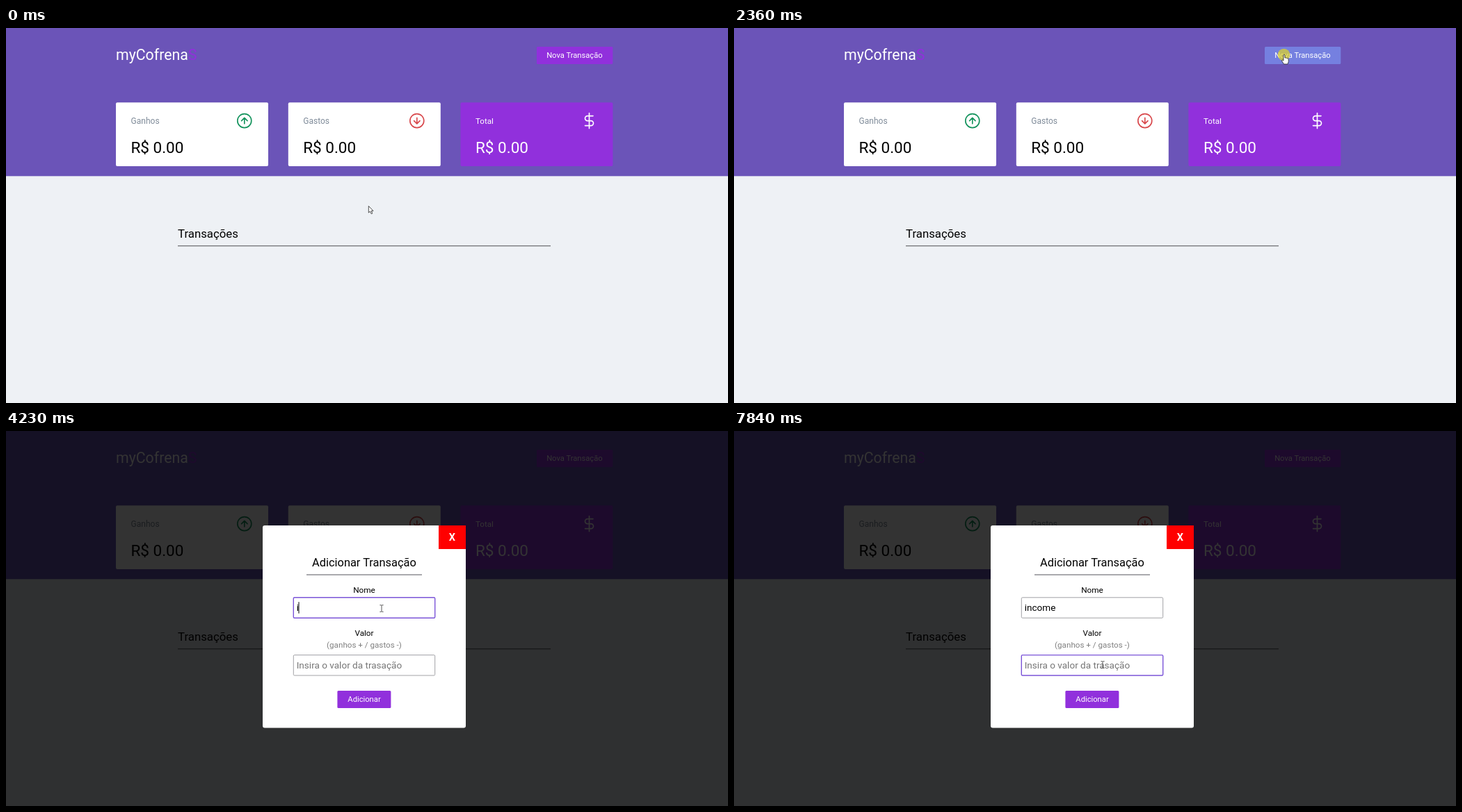
Write an HTML page that moves like this. It is 1038 px wide and 540 px high and loops after 8000 ms.

```html
<!DOCTYPE html>
<html lang="pt-BR">
<head>
<meta charset="utf-8">
<title>Transações</title>
<style>
  html, body { margin: 0; width: 100%; height: 100%; overflow: hidden; background: #eef1f5; }
  svg { display: block; width: 1038px; height: 540px; font-family: Roboto, Inter, sans-serif; }
  text { white-space: pre; }
  .mid { text-anchor: middle; }
  .brand { font-size: 21.3px; fill: #fff; }
  .label { font-size: 12px; fill: #7f8b99; }
  .sum { font-size: 22.5px; }
  .white { fill: #fff; }
  .accent { fill: #9130dc; }
  .icon { fill: none; stroke-width: 1.65; stroke-linecap: round; stroke-linejoin: round; }
  .btn { font-size: 11.2px; fill: #fff; }
  .field { fill: #fff; stroke: #a2a2a6; }
  .field.focus { stroke: #7b54d8; stroke-width: 1.4; }
  .value { font-size: 13.55px; }
  .value.hint { fill: #757575; }
  .hide { display: none; }
</style>
</head>
<body>
<svg viewBox="0 0 1038 540">
  <defs>
    <g id="ring">
      <circle r="10"/>
      <path d="M0 4.2V-4.2M-4.2 0L0-4.2L4.2 0"/>
    </g>
  </defs>

  <rect width="1038" height="540" fill="#eef1f5"/>
  <rect width="1038" height="213.3" fill="#6b54b8"/>
  <text class="brand" x="158" y="46.3">myCofrena<tspan class="accent">S</tspan></text>
  <rect id="open" x="763" y="27" width="109.3" height="25" rx="1.5"/>
  <text class="btn mid" x="817.4" y="43.4">Nova Transação</text>

  <g fill="#fff">
    <rect x="158" y="107.3" width="219" height="91.7" rx="2"/>
    <rect x="405.8" y="107.3" width="219" height="91.7" rx="2"/>
    <rect class="accent" x="653.4" y="107.3" width="219" height="91.7" rx="2"/>
  </g>
  <text class="label" x="179.6" y="137.8">Ganhos</text>
  <text class="sum" x="179.4" y="179.6">R$ 0.00</text>
  <use href="#ring" class="icon" stroke="#13935c" transform="translate(342.8 133.6)"/>
  <text class="label" x="427.3" y="137.8">Gastos</text>
  <text class="sum" x="427.2" y="179.6">R$ 0.00</text>
  <use href="#ring" class="icon" stroke="#d8484c" transform="translate(590.8 133.6) scale(1 -1)"/>
  <text class="label white" x="675" y="137.8" style="font-size:11.6px">Total</text>
  <text class="sum white" x="675" y="179.6">R$ 0.00</text>
  <path class="icon" stroke="#fff" transform="translate(826.5 121.6)"
    d="M12 1V23M17.5 5H9.5a3.5 3.5 0 0 0 0 7h5a3.5 3.5 0 0 1 0 7H6"/>

  <text x="247" y="302" font-size="16.8">Transações</text>
  <rect x="247" y="313.3" width="536" height="1" fill="#4c4c50"/>

  <g id="modal">
    <rect width="1038" height="540" opacity=".8"/>
    <rect x="369" y="136" width="292" height="291.6" rx="3" fill="#fff"/>
    <rect x="622" y="136" width="39" height="34" fill="#f00"/>
    <text class="mid white" x="641.4" y="157.7" font-size="14.5" font-weight="700">X</text>
    <text class="mid" x="514.9" y="195" font-size="16.4">Adicionar Transação</text>
    <rect x="432" y="206.5" width="166" height="1" fill="#55555c"/>
    <text class="mid" x="515" y="233.4" font-size="11.8">Nome</text>
    <rect class="field" id="name" x="413.3" y="239.8" width="203.4" height="29.4" rx="1.5"/>
    <text class="value" id="nameText" x="417.7" y="259"></text>
    <text class="mid" x="515" y="295.3" font-size="11.7">Valor</text>
    <text class="mid" x="515" y="312.3" font-size="11.65" fill="#808080">(ganhos + / gastos -)</text>
    <rect class="field" id="amount" x="413.3" y="322.6" width="203.4" height="29.4" rx="1.5"/>
    <text class="value hint" x="417.7" y="341.8">Insira o valor da trasação</text>
    <rect id="caret" width="1" height="16.5"/>
    <rect class="accent" x="476.4" y="374" width="77" height="25" rx="1.5"/>
    <text class="btn mid" x="515" y="390.4">Adicionar</text>
  </g>

  <circle id="click" r="8.8" fill="#e4d91c" opacity=".68"/>
  <g id="pointer" stroke-linejoin="round">
    <path id="arrow" fill="#fff" stroke="#222" stroke-width=".8"
      d="M.3.4V10L2.5 8L4.2 11.6L5.8 10.9L4.2 7.3H7Z"/>
    <path id="hand" fill="#fff" stroke="#222" stroke-width=".8"
      d="M-1 .8Q0-.7 1 .8V5Q2 4.2 2.7 5.3Q3.8 4.7 4.4 5.8Q6 5.3 6.2 7V10.5L5 14H-.5L-3.8 8.8Q-3.6 7-1 9Z"/>
    <path id="beam" fill="none" stroke="#444" stroke-width=".9"
      d="M-2.6-4.8H-.8L0-4.2L.8-4.8H2.6M0-4.2V4.2M-2.6 4.8H-.8L0 4.2L.8 4.8H2.6"/>
  </g>
</svg>
<script>
const LOOP = 8000, TICK = 57;
const $ = id => document.getElementById(id);
const show = (id, on) => $(id).classList.toggle('hide', !on);
const within = (t, a, b) => t >= a && t < b;

// Pointer moves: each starts at a time and passes through [time, x, y] points.
const route = [
  [0, 521, 256], [493, 521, 256], [780, 632, 180], [1010, 729, 97], [1120, 750, 87],
  [1235, 772, 70], [1350, 783, 58], [1407, 786, 51], [1980, 791, 38], [2470, 791, 38],
  [2760, 680, 130], [3110, 548, 226], [3160, 544, 246], [3340, 540, 255.5],
  [5543, 540, 255.5], [5600, 538, 268], [5700, 532, 303], [5830, 531, 322],
  [6040, 530, 336.5], [8000, 530, 336.5]
];
const typed = [[4230, 'i'], [4400, 'n'], [4570, 'c'], [4740, 'o'], [4910, 'm'], [5200, 'e']];
const clicks = [[2310, 2430], [3280, 3400], [6210, 6330]];
const carets = [[3280, 3830], [4230, 5420], [6210, 6780], [7280, 7840]];

function pointAt(t) {
  const i = Math.max(1, route.findIndex(p => p[0] > t));
  const [t0, x0, y0] = route[i - 1], [t1, x1, y1] = route[i];
  const k = (t - t0) / (t1 - t0);
  return [x0 + (x1 - x0) * k, y0 + (y1 - y0) * k];
}

// Screen captures arrive in even ticks, counted from the start of each move.
function captured(t) {
  const start = [0, 550, 1400, 2430, 3160, 5600].filter(s => s <= t).pop();
  return start + Math.floor((t - start + 4) / TICK) * TICK;
}

function mix(a, b, k) {
  return `rgb(${a.map((v, i) => Math.round(v + (b[i] - v) * k))})`;
}

function draw(t) {
  const [x, y] = pointAt(Math.min(captured(t), LOOP - 1));
  const overButton = within(t, 1400, 2430);
  const overField = within(t, 3160, 5600) || t >= 5830;
  const hover = within(t, 1400, 2540) ? Math.min(1, (t - 1350) / 200) : 0;
  $('open').style.fill = mix([145, 48, 220], [117, 128, 224], hover);

  $('pointer').setAttribute('transform', `translate(${x} ${y})`);
  show('pointer', !within(t, 4280, 5600));
  show('arrow', !overButton && !overField);
  show('hand', overButton);
  show('beam', overField);

  $('click').setAttribute('transform', `translate(${x - .5} ${y + .5})`);
  show('click', clicks.some(c => within(t, ...c)));

  show('modal', t >= 2430);
  $('name').classList.toggle('focus', within(t, 3280, 6210));
  $('amount').classList.toggle('focus', t >= 6210);

  const word = typed.filter(k => t >= k[0]).map(k => k[1]).join('');
  const text = $('nameText');
  text.textContent = word || 'Insira o nome da transação';
  text.classList.toggle('hint', !word);

  const inAmount = t >= 6210;
  const end = word && !inAmount && t >= 2430 ? text.getComputedTextLength() : 0;
  $('caret').setAttribute('x', 417.2 + end);
  $('caret').setAttribute('y', inAmount ? 329 : 246.2);
  show('caret', carets.some(c => within(t, ...c)));
}

const begin = performance.now();
function frame() {
  draw((performance.now() - begin) % LOOP);
  requestAnimationFrame(frame);
}
frame();
</script>
</body>
</html>
```
